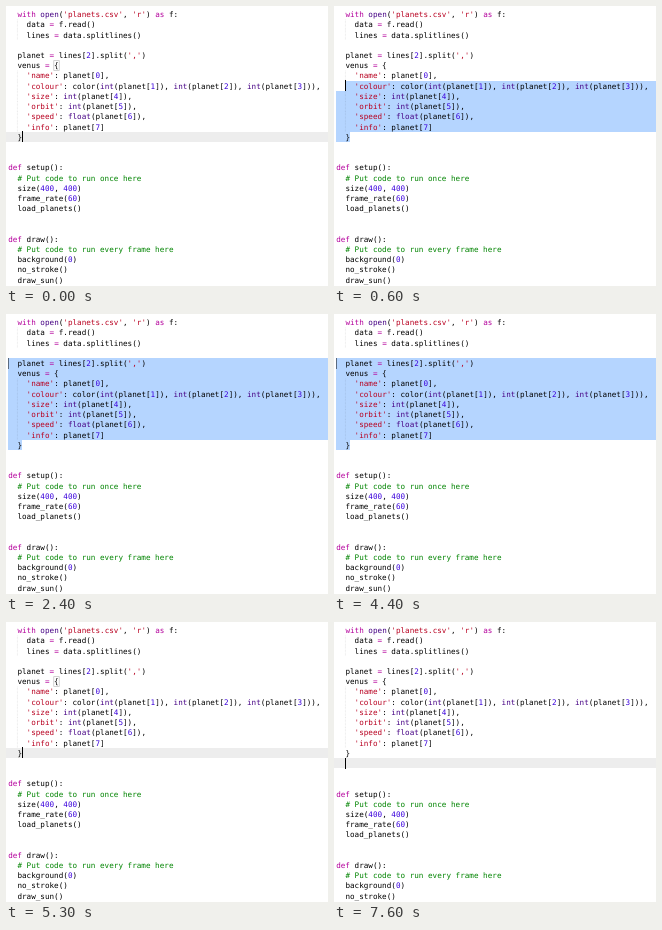
Recreate the animation shown at these times as an HTML page. Size 322 px wide and 280 px high, loop 8000 ms.

```html
<!DOCTYPE html>
<html lang="en">
<head>
<meta charset="utf-8">
<title>Code editor</title>
<style>
html, body { margin: 0; width: 100%; height: 100%; overflow: hidden; background: #fff; }
svg { display: block; width: 322px; height: 280px; }
rect { shape-rendering: crispEdges; }
text {
  font: 7.64px "DejaVu Sans Mono", "Liberation Mono", monospace;
  white-space: pre;
  text-rendering: geometricPrecision;
}
.word { fill: #b4009c; }
.builtin { fill: #450084; }
.string { fill: #b80020; }
.number { fill: #3a00dc; }
.comment { fill: #008400; }
</style>
</head>
<body>
<svg viewBox="0 0 322 280">
  <rect id="active" x="0" width="322" fill="#ededed"/>
  <g id="selection" fill="#b5d5ff"></g>
  <g id="guides" stroke="#000" stroke-opacity=".16" stroke-width=".6" stroke-dasharray=".7 .7"></g>
  <g id="upper"></g>
  <g id="lower"></g>
  <rect id="bracket" fill="none" stroke="#bfbfbf" stroke-width=".7" style="shape-rendering:auto"/>
  <rect id="cursor" width="1" height="11" fill="#000"/>
</svg>
<script>
const LOOP = 8000, LEFT = 2.2, TOP = 3.4, CHAR = 4.6, ROW = 10.21, WIDTH = 322;
const END_ROW = 12, END_COL = 3;
const DESELECT = 5100, ENTER = 6600;
// [fade-out start, fade-in start, fade length]
const BLINKS = [
  [1500, 1900, 100], [2400, 2800, 100], [3500, 3900, 100],
  [4400, 4800, 100], [5700, 6100, 100], [7200, 7600, 0]
];
const CODE = `  with open('planets.csv', 'r') as f:
    data = f.read()
    lines = data.splitlines()

  planet = lines[2].split(',')
  venus = {
    'name': planet[0],
    'colour': color(int(planet[1]), int(planet[2]), int(planet[3])),
    'size': int(planet[4]),
    'orbit': int(planet[5]),
    'speed': float(planet[6]),
    'info': planet[7]
  }


def setup():
  # Put code to run once here
  size(400, 400)
  frame_rate(60)
  load_planets()


def draw():
  # Put code to run every frame here
  background(0)
  no_stroke()
  draw_sun()`.split('\n');
const TOKEN = /(?<comment>#.*)|(?<string>'[^']*')|(?<word>\b(?:with|as|def)\b|=)|(?<builtin>\b(?:open|int|float)\b)|(?<number>\b\d+\b)/g;

const $ = id => document.getElementById(id);
const colX = col => LEFT + col * CHAR;
const rowY = row => TOP + row * ROW;

function add(parent, tag, attrs, content) {
  const node = document.createElementNS('http://www.w3.org/2000/svg', tag);
  set(node, attrs);
  if (content) node.textContent = content;
  return parent.appendChild(node);
}

function set(node, attrs) {
  for (const key in attrs) node.setAttribute(key, attrs[key]);
}

function drawLine(line, row) {
  const indent = line.search(/\S/);
  if (indent < 0) return;
  const text = add($(row > END_ROW ? 'lower' : 'upper'), 'text', { x: colX(indent), y: rowY(row) + 7.8 });
  let last = indent;
  for (const match of line.matchAll(TOKEN)) {
    text.append(line.slice(last, match.index));
    const kind = Object.keys(match.groups).find(key => match.groups[key]);
    add(text, 'tspan', { class: kind }, match[0]);
    last = match.index + match[0].length;
  }
  text.append(line.slice(last));
  if (indent === 4) {
    const x = colX(2);
    add($('guides'), 'line', { x1: x, x2: x, y1: rowY(row), y2: rowY(row + 1) });
  }
}

CODE.forEach(drawLine);
const bands = CODE.slice(0, END_ROW + 1).map((_, row) =>
  add($('selection'), 'rect', { y: rowY(row), height: ROW }));
set($('bracket'), { x: colX(10) - .4, y: rowY(5) + .2, width: CHAR + .8, height: ROW - .4 });
set($('active'), { height: ROW });

function caretAt(t) {
  if (t >= ENTER) return [END_ROW + 1, 2];
  if (t < 100 || t >= DESELECT) return [END_ROW, END_COL];
  const row = Math.max(4, END_ROW + 1 - Math.floor(t / 100));
  return [row, row === 4 ? 0 : 2];
}

function caretAlpha(t) {
  for (const [off, on, fade] of BLINKS) {
    if (t >= off && t < on + fade) return t < off + fade || t >= on ? .5 : 0;
  }
  return 1;
}

function render(t) {
  const [row, col] = caretAt(t);
  const selecting = t >= 100 && t < DESELECT;
  const entered = t >= ENTER;

  bands.forEach((band, i) => {
    const x = colX(i === row ? col : 0);
    const right = i === END_ROW ? colX(END_COL) : WIDTH;
    set(band, { x, width: selecting && i >= row ? right - x : 0 });
  });
  set($('active'), { y: rowY(row), opacity: selecting ? 0 : 1 });
  set($('bracket'), { opacity: selecting || entered ? 0 : 1 });
  set($('lower'), { transform: `translate(0 ${entered ? ROW : 0})` });
  set($('cursor'), { x: Math.floor(colX(col)), y: Math.floor(rowY(row)), opacity: caretAlpha(t) });
}

const start = performance.now();
function tick() {
  render((performance.now() - start) % LOOP);
  requestAnimationFrame(tick);
}
tick();
</script>
</body>
</html>
```
